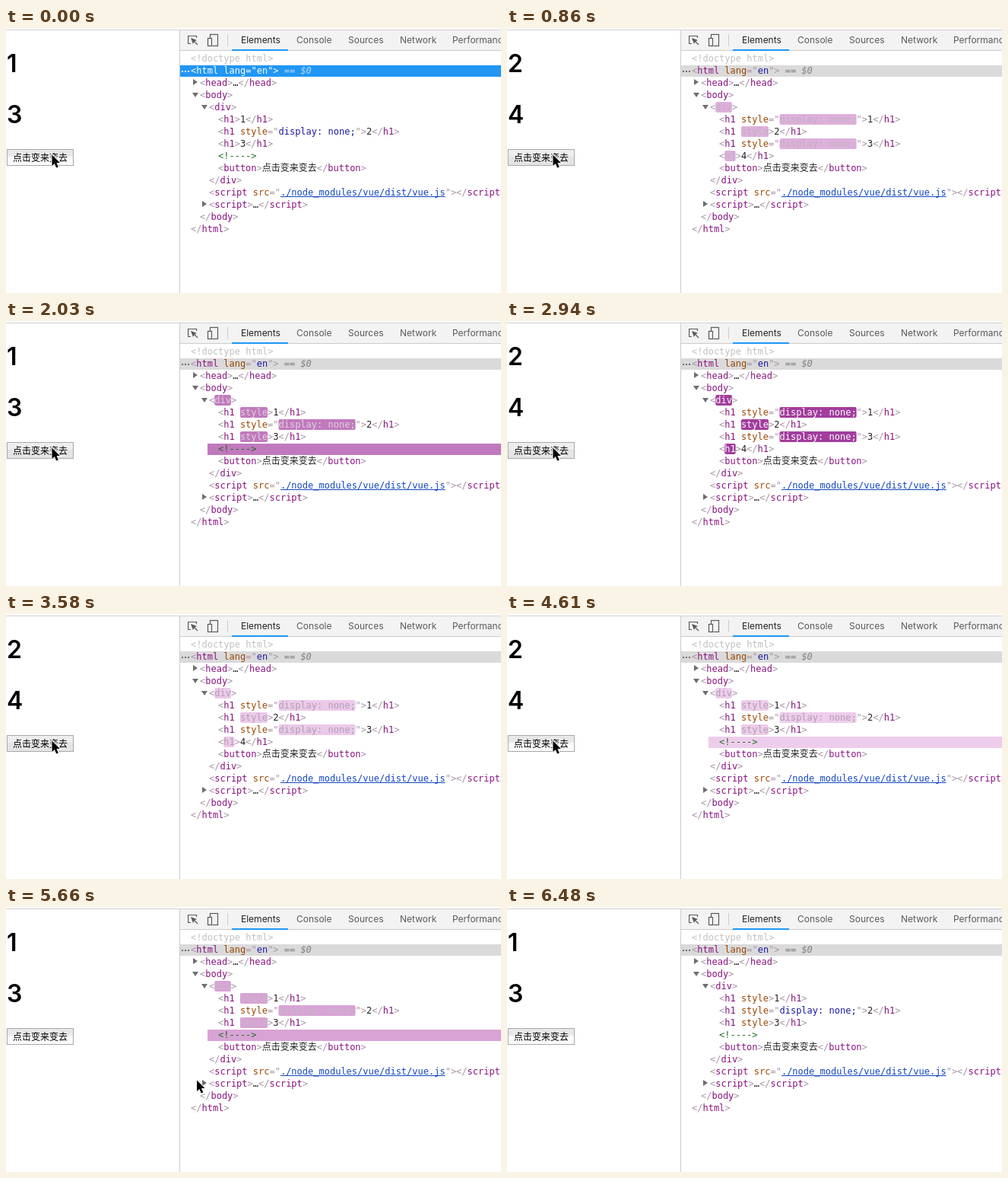
Recreate the animation shown at these times as an HTML page with a canvas. Size 651 by 348 pixels, loop 6580 ms.

```html
<!DOCTYPE html>
<html lang="zh-CN">
<head>
<meta charset="utf-8">
<style>
html, body { margin: 0; width: 100%; height: 100%; overflow: hidden; background: #fff; }
canvas { display: block; }
</style>
</head>
<body>
<canvas id="stage" width="651" height="348"></canvas>
<script>
const ctx = document.getElementById('stage').getContext('2d');
const LOOP = 6580;
const CLICKS = [180, 1570, 2660, 3750, 4440, 5130];
const UPDATES = [430, 1866, 2930, 3911, 4670, 5310];
const FADE = 1400, FADE_END = 6480;
const LABEL = '点击变来变去';
const CJK = '"Noto Sans CJK SC", "Noto Sans CJK", sans-serif';
const MONO = '12px "DejaVu Sans Mono", ' + CJK;
const UI = 'Inter, Roboto, sans-serif';

const COLORS = {
  punct: [168, 148, 166], tag: [136, 18, 128], attr: [153, 69, 0],
  value: [26, 26, 166], text: [34, 34, 34], note: [35, 110, 37],
  link: [17, 70, 190], doctype: [192, 192, 192]
};
const WHITE = [255, 255, 255], FLASH = [158, 54, 153], PALE = [245, 219, 244];

const rgb = c => `rgb(${c.map(Math.round).join()})`;
const mix = (a, b, k) => a.map((v, i) => v + (b[i] - v) * k);
const lastIndex = (times, t) => times.filter(v => v <= t).length - 1;

// cubic-bezier(0, 0, .2, 1)
function easeOut(x) {
  let lo = 0, hi = 1;
  for (let i = 0; i < 20; i++) {
    const s = (lo + hi) / 2;
    if (0.6 * (1 - s) * s * s + s ** 3 < x) lo = s; else hi = s;
  }
  return 3 * (1 - lo) * lo * lo + lo ** 3;
}

function flashAt(t) {
  const k = lastIndex(UPDATES, t);
  if (k < 0 || t >= FADE_END) return null;
  const p = (t - UPDATES[k]) / FADE;
  if (p >= 1) return null;
  if (p < 0.8) {
    const e = easeOut(p / 0.8);
    return { bg: mix(FLASH, PALE, e), ink: () => mix(WHITE, COLORS.punct, e) };
  }
  const e = easeOut((p - 0.8) / 0.2);
  return { bg: mix(PALE, WHITE, e), ink: own => mix(COLORS.punct, own, e) };
}

function rect(x, y, w, h, fill) {
  ctx.fillStyle = fill;
  ctx.fillRect(x, y, w, h);
}

function poly(points, fill) {
  ctx.beginPath();
  points.forEach(([x, y]) => ctx.lineTo(x, y));
  ctx.closePath();
  if (fill) { ctx.fillStyle = fill; ctx.fill(); }
}

function write(str, x, y, font, fill) {
  ctx.font = font;
  ctx.fillStyle = fill;
  ctx.fillText(str, x, y);
}

// Each part is [kind, text, changed].
function line(row, x, parts, flash, ink) {
  const y = 44 + row * 16;
  ctx.font = MONO;
  for (const [kind, str, changed] of parts) {
    const w = ctx.measureText(str).width;
    let color = ink || COLORS[kind];
    if (changed && flash) {
      ctx.fillStyle = rgb(flash.bg);
      ctx.beginPath();
      ctx.roundRect(x, y - 11, w, 14, 2);
      ctx.fill();
      color = flash.ink(color);
    }
    write(str, x, y, MONO, rgb(color));
    if (kind === 'link') rect(x, y + 1, w, 1, rgb(color));
    x += w;
  }
}

const open = (name, attrs = [], changed) =>
  [['punct', '<'], ['tag', name, changed], ...attrs, ['punct', '>']];
const close = name => [['punct', '</'], ['tag', name], ['punct', '>']];
const attribute = (name, value, kind = 'value', changed) =>
  [['punct', ' '], ['attr', name], ['punct', '="'], [kind, value, changed], ['punct', '"']];
const element = (name, str, attrs, changed) =>
  [...open(name, attrs, changed), ['text', str], ...close(name)];

const hidden = attribute('style', 'display: none;', 'value', true);
const emptied = [['punct', ' '], ['attr', 'style', true]];

function arrow(x, row, expanded) {
  const y = 40 + row * 16;
  poly(expanded ? [[x, y - 3], [x + 8, y - 3], [x + 4, y + 3]]
                : [[x + 1, y - 5], [x + 7, y - 1], [x + 1, y + 3]], '#6e6e6e');
}

function drawTree(t) {
  const update = lastIndex(UPDATES, t);
  const swapped = update >= 0 && update % 2 === 0;
  const shown = update < 0 ? [] : emptied;
  const flash = flashAt(t);
  const focused = t < CLICKS[0];

  line(0, 243, [['doctype', '<!doctype html>']]);
  rect(229, 49, 422, 15, focused ? '#2196f3' : '#dadada');
  line(1, 243, open('html', attribute('lang', 'en')), null, focused && WHITE);
  const dim = focused ? '#b5dcfb' : '#7f7f7f';
  write('==', 365.7, 60, MONO, dim);
  write('$0', 387.4, 60, 'italic ' + MONO, dim);
  for (let i = 0; i < 3; i++) rect(231 + i * 4, 56, 2, 2, focused ? '#fff' : '#6e6e6e');

  arrow(245, 2, false);
  line(2, 255, element('head', '…'));
  arrow(245, 3, true);
  line(3, 255, open('body'));
  arrow(257, 4, true);
  line(4, 267, open('div', [], true), flash);
  line(5, 279, element('h1', '1', swapped ? hidden : shown), flash);
  line(6, 279, element('h1', '2', swapped ? emptied : hidden), flash);
  line(7, 279, element('h1', '3', swapped ? hidden : shown), flash);
  if (swapped) {
    line(8, 279, element('h1', '4', [], true), flash);
  } else {
    if (flash) rect(265, 161, 386, 15, rgb(flash.bg));
    line(8, 279, [['note', '<!---->']]);
  }
  line(9, 279, element('button', LABEL));
  line(10, 267, close('div'));
  line(11, 267, [...open('script', attribute('src', './node_modules/vue/dist/vue.js', 'link')),
    ...close('script')]);
  arrow(257, 12, false);
  line(12, 267, element('script', '…'));
  line(13, 255, close('body'));
  line(14, 243, close('html'));
}

function drawToolbar() {
  rect(229, 3, 422, 26, '#f3f3f3');
  rect(0, 2, 651, 1, '#d0d0d0');
  rect(228, 3, 1, 345, '#cccccc');
  rect(229, 29, 422, 1, '#cccccc');
  rect(297, 28, 74, 2, '#2196f3');
  rect(291, 8, 1, 16, '#cccccc');

  ctx.strokeStyle = '#5a5a5a';
  ctx.lineWidth = 1.2;
  ctx.beginPath();
  ctx.moveTo(243, 20.5);
  ctx.lineTo(239.6, 20.5);
  ctx.lineTo(239.6, 10.5);
  ctx.lineTo(250.5, 10.5);
  ctx.lineTo(250.5, 13);
  ctx.moveTo(247, 17);
  ctx.lineTo(252, 22);
  ctx.stroke();
  poly([[243, 13], [251, 16], [248, 17.5], [246, 21]], '#5a5a5a');
  ctx.strokeRect(268.5, 8.5, 10, 15);
  rect(264.5, 13, 7, 11, '#f3f3f3');
  ctx.strokeRect(265.5, 13.5, 5, 10);

  const tabs = { Elements: 309, Console: 382, Sources: 450, Network: 518, Performance: 587 };
  for (const name in tabs) {
    write(name, tabs[name], 20, '12px ' + UI, name === 'Elements' ? '#222' : '#5a5a5a');
  }
}

function drawPage(t) {
  const click = lastIndex(CLICKS, t);
  const swapped = lastIndex(CLICKS.map(v => v + 110), t) % 2 === 0;
  const pressed = click >= 0 && t - CLICKS[click] < 100;
  const font = '600 32px ' + UI;
  write(swapped ? '2' : '1', 1, 58, font, '#000');
  write(swapped ? '4' : '3', 1, 125, font, '#000');

  rect(1, 159, 88, 22, '#a9a9a9');
  const light = t < CLICKS[0] || t >= CLICKS[4];
  const shade = ctx.createLinearGradient(0, 160, 0, 180);
  const [top, bottom] = pressed ? ['#e0e0e0', '#d4d4d4']
    : light ? ['#e8e8e8', '#fafafa'] : ['#eeeeee', '#e4e4e4'];
  shade.addColorStop(0, top);
  shade.addColorStop(0.38, top);
  shade.addColorStop(0.5, bottom);
  rect(2, 160, 86, 20, shade);
  write(LABEL, 9, 174.5, '12px ' + CJK, '#000');
}

function drawCursor(t) {
  const k = Math.max(0, (t - 5500) / 480);
  const x = 60 - (t >= CLICKS[5] ? 1 : 0) + 571 * k, y = 166 + 182 * k;
  if (y > 350) return;
  ctx.save();
  ctx.translate(x, y);
  poly([[0.5, 0.5], [0.5, 15], [3.8, 12], [6.2, 17.5], [8.8, 16.4], [6.5, 11], [11, 11]]);
  ctx.strokeStyle = '#fff';
  ctx.lineWidth = 2;
  ctx.stroke();
  ctx.fillStyle = '#000';
  ctx.fill();
  ctx.restore();
}

function draw(now) {
  const t = now % LOOP;
  rect(0, 0, 651, 348, '#fff');
  drawToolbar();
  drawTree(t);
  drawPage(t);
  drawCursor(t);
  requestAnimationFrame(draw);
}
requestAnimationFrame(draw);
</script>
</body>
</html>
```
